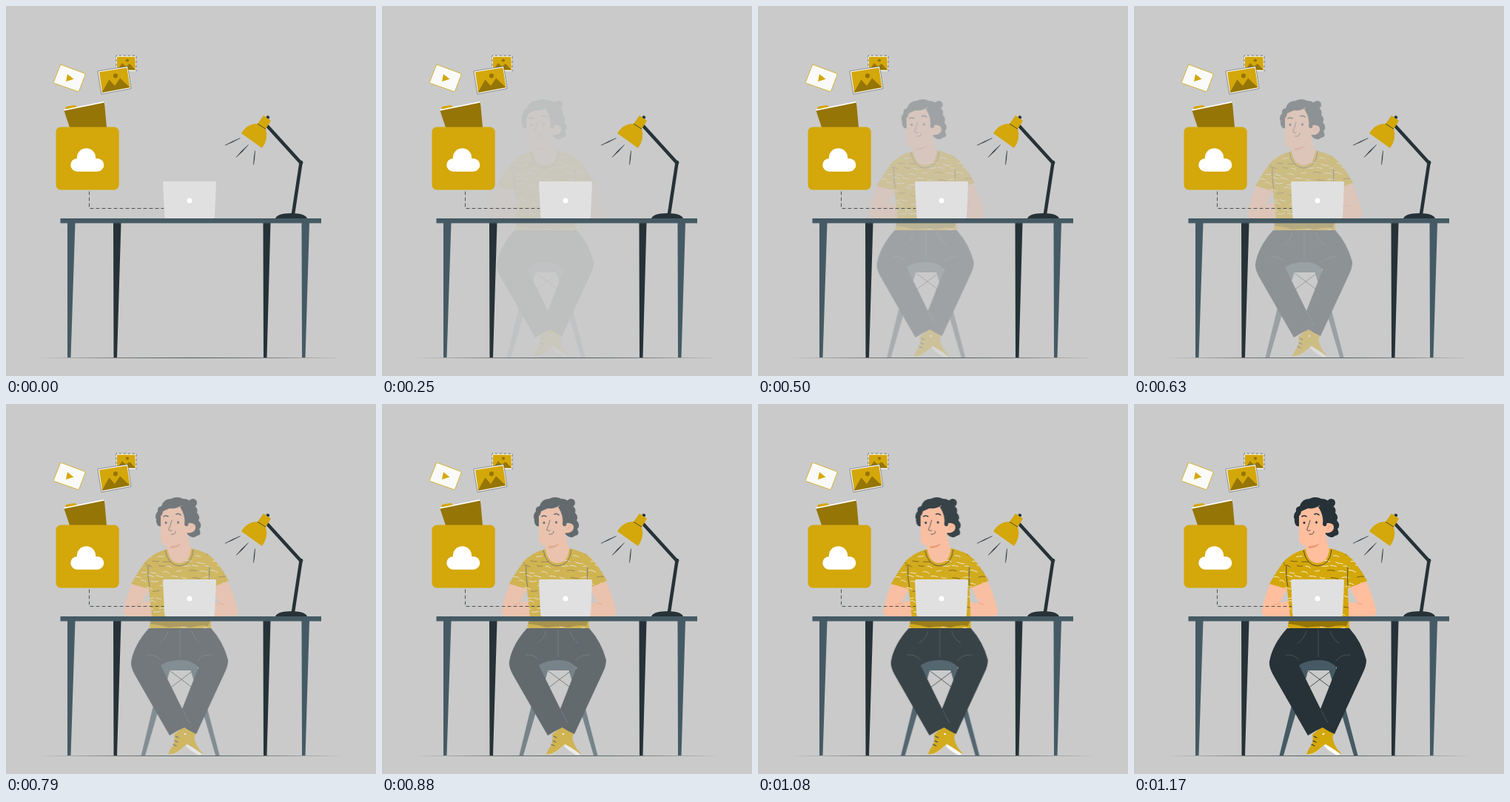
An HTML page that plays this animation: 500 px wide and 500 px high, repeating every 1.21 s.

```html
<!DOCTYPE html>
<html lang="en">
<head>
<meta charset="utf-8">
<title>Desk and cloud</title>
<style>
html, body { margin: 0; width: 100%; height: 100%; overflow: hidden; background: #cacaca; }
svg { display: block; width: 100vw; height: 100vh; }
#person { opacity: 0; }
.gold { fill: #d4a70a; }
.brown { fill: #957506; }
.dark { fill: #263238; }
.slate { fill: #455a64; }
.skin { fill: #ffbe9d; }
.white { fill: #fff; }
.line { fill: none; stroke: #263238; stroke-width: .8; stroke-linecap: round; stroke-linejoin: round; }
.fold { fill: none; stroke: #5b676d; stroke-width: .6; stroke-linecap: round; }
</style>
</head>
<body>
<svg viewBox="0 0 500 500">
  <defs>
    <clipPath id="shirtClip">
      <path id="shirt" d="M232 196Q214 201 204 211Q195 222 183 243L207 250L211 287L207 303H291L289 249L315 239Q305 221 295 210Q285 199 264 195Q263 214 248 215Q235 215 232 196Z"/>
    </clipPath>
  </defs>

  <path class="dark" d="M45 475.4Q250 474.6 455 475.4Q250 476.2 45 475.4Z"/>

  <g id="person">
    <!-- chair -->
    <path class="slate" d="M225 358H236L202 475H196.5ZM263 358H272L302.5 475H297Z"/>
    <path class="line" d="M236 361L268 385M266 361L234 385"/>
    <path class="slate" d="M223 350Q248 338 273 350V360H223Z"/>

    <!-- shoes -->
    <path class="gold" d="M257 457L268 450Q271 464 278 470Q281 473 277 474Q266 468 257 459Z"/>
    <path class="white" d="M257 459Q267 464 279 473Q277 475 273 474Q263 469 256 461Z"/>
    <path class="gold" d="M241 447L255 435L270 445L268 452Q258 460 247 469Q240 474 233 474Q235 467 239 462Q243 455 241 447Z"/>
    <path class="line" style="stroke:#e8dcb0" d="M234 474Q241 474 248 469L260 459"/>
    <path class="line" style="stroke-width:1.1" d="M243 449L247 451M242 455L246 457M240 460L244 462"/>
    <circle class="white" cx="256" cy="446" r="1.3"/>

    <!-- trousers -->
    <path class="dark" d="M314 346Q314 354 309 364L271 446Q262 442 253 436L246 430L252 412L274 356Q264 345 249 346H240V303H291Q308 322 314 346Z"/>
    <path class="dark" d="M207 303H255V346Q234 345 223 353L252 412L262 431L257 436Q246 441 235 448L188 366Q182 355 183 348Q187 325 207 303Z"/>
    <path class="fold" d="M249 305V342M205 339Q217 338 223 346M292 339Q279 338 273 347M221 323Q230 318 233 307M277 323Q268 318 265 307M253 414L262 431"/>

    <!-- arms -->
    <path class="skin" d="M184 242L208 248L197 269Q205 266 215 265V287H180Q172 287 173 279Q176 262 184 242Z"/>
    <path class="skin" d="M291 246L313 238Q322 258 327 278Q329 287 320 287H281V272Q285 265 290 268L302 269Z"/>
    <path class="fold" style="stroke:#d98f6d" d="M197 269Q192 271 189 272M302 269L308 271"/>

    <!-- hair, face and neck -->
    <circle class="dark" cx="266.5" cy="133.5" r="5.5"/>
    <path class="dark" d="M220 165Q216 161 217 156Q214 150 219 145Q218 139 224 138Q227 128 237 128Q245 124 253 128Q263 128 267 137Q274 140 272 147Q277 152 274 157Q280 164 275 169Q279 177 272 178Q266 183 260 177L250 168Z"/>
    <path class="skin" d="M232 192H237L255 176H259L262 192L265 196Q263 215 248 216Q235 215 231 197Z"/>
    <path class="skin" d="M223 150Q226 141 235 141Q245 142 251 137Q256 146 256 156L258 164Q259 160 264 161Q271 162 270 168Q268 175 259 174Q258 183 251 188Q243 193 233 192Q224 191 223 184Z"/>
    <path fill="#eb996e" d="M236 192Q245 192 251 188Q247 195 236 195Z"/>
    <path class="dark" d="M252 137Q263 143 262 154L260 164Q257 167 255 163Q257 151 249 139ZM221 152Q225 152 226 145L235 141L224 140Z"/>
    <path class="line" style="stroke-width:1.6" d="M227 152Q230 150 233 152M244 149Q247 147 250 150"/>
    <path class="line" d="M238 157Q236 165 233.5 170Q235 172 238 171M237 176Q243 177 243 172"/>
    <ellipse class="dark" cx="230" cy="160.500" rx="1.4" ry="1.8"/>
    <ellipse class="dark" cx="246.500" cy="160" rx="1.4" ry="1.8"/>
    <path class="fold" style="stroke:#d98f6d" d="M262 169Q263 164 267 165"/>

    <!-- shirt -->
    <use href="#shirt" class="gold"/>
    <g clip-path="url(#shirtClip)">
      <g id="marks"></g>
      <path class="brown" d="M207 293H290L287 300Q276 298 263 302Q249 299 234 302Q221 298 208 297Z"/>
    </g>
    <path class="line" d="M229 198Q233 218 248 219Q265 218 267 197M206 219Q205 234 208 247M289 220Q288 232 289 246"/>
  </g>

  <path class="line" stroke-dasharray="4 4" d="M112.500 251V273.500H213"/>

  <!-- desk -->
  <path class="dark" d="M145 293H155.500L150 475H145.500ZM347.500 293H357.500L352.500 475H348Z"/>
  <path class="slate" d="M83 293H93.500L87.500 475H83ZM399.500 293H410L404.500 475H400Z"/>
  <path class="dark" d="M364 287Q367 280 385.500 280T407 287Z"/>
  <path class="slate" d="M73.500 287H426V293.500H73.500Z"/>

  <!-- laptop -->
  <path fill="#e0e0e0" d="M214 237H282Q284 237 284 239L282 285Q282 287 280 287H216Q214.400 287 214.300 285L212 239Q212 237 214 237Z"/>
  <circle class="white" cx="248" cy="263" r="3.500"/>

  <!-- lamp -->
  <path class="line" style="stroke-width:4.600" d="M388 281L398.500 212L353 162"/>
  <circle class="dark" cx="398.500" cy="211.500" r="2.800"/>
  <circle class="dark" cx="353.800" cy="150.500" r="2.300"/>
  <path class="gold" d="M348 148L358 155L351 166Q355 180 346 192L318 172Q326 159 340 159Z"/>
  <path class="line" d="M340.500 159.500L350.500 166"/>
  <path class="dark" d="M296 188.300Q306 182.500 316.500 178.500Q307 184 296 188.300ZM311 204.500Q318 195.500 327.500 187.500Q320 197 311 204.500ZM334.500 214.500Q334.800 205 336.500 195.500Q336.400 206 334.500 214.500Z" stroke="#263238" stroke-width=".4"/>

  <!-- files -->
  <path class="white" d="M149 67L175.500 67.500L176 88L149 87.500Z"/>
  <path class="gold" d="M150 68.500L174.500 68.800L175 86.500L150 86Z"/>
  <path class="brown" d="M151 86L157 77L162 82L167 78L175 86.500Z"/>
  <circle class="brown" cx="164" cy="73.500" r="2.100"/>
  <path class="line" style="stroke-width:.6" stroke-dasharray="3 3" d="M149 87V66.800L176 67.200V88"/>

  <path class="white" stroke="#263238" stroke-width=".5" d="M124 88L164.500 81.500L169 111.500L129 119Z"/>
  <path class="gold" d="M126 89.300L163.500 83.300L167.500 110L130 117Z"/>
  <path class="brown" d="M129.800 116.500L139.500 99.500L147 108L154 97.500L167.500 110L130 117Z"/>
  <circle class="brown" cx="148" cy="94.300" r="3.100"/>

  <path fill="#fafafa" stroke="#d4a70a" stroke-width=".8" stroke-linejoin="round" d="M75 79.500L106 91Q107.500 92 107 93L99 114Q98 116 97 115.500L65.500 104.500Q64 104 64.500 102.500L73 81Q73.500 79 75 79.500Z"/>
  <path class="gold" d="M83 92L91.500 98.800L81 102Z"/>

  <path class="gold" d="M80 139Q80 136 83 135.500L93 134Q95 134 96.500 137L97 141Z"/>
  <path class="white" d="M78 140L132 129L134 133L80 144Z"/>
  <path class="brown" d="M78.500 141.500L133 130.500L136 164H86Z"/>
  <rect class="gold" x="67.500" y="163.500" width="85.200" height="85" rx="6.500"/>
  <rect class="white" x="87.300" y="206" width="45" height="17.700" rx="8.800"/>
  <circle class="white" cx="108.500" cy="205" r="12.700"/>
</svg>
<script>
const LOOP = 1210;
const FRAME = 1000 / 24;
const FIRST = 6;
const STEPS = 22;

// Short pale and dark flecks spread over the shirt cloth.
function drawMarks() {
  let seed = 11;
  const rnd = () => (seed = (seed * 16807) % 2147483647) / 2147483647;
  const paths = { "#fff": "", "#5f4b08": "" };
  for (let y = 203, row = 0; y < 303; y += 7, row++) {
    for (let x = 184 + (row % 2) * 8; x < 316; x += 16) {
      const color = rnd() < 0.82 ? "#fff" : "#5f4b08";
      const len = 6 + rnd() * 4;
      const px = x + rnd() * 6, py = y + rnd() * 4;
      paths[color] += `M${px} ${py}q${len / 2} ${rnd() * 4 - 2} ${len} ${rnd() * 4 - 1}`;
    }
  }
  document.getElementById("marks").innerHTML = Object.entries(paths).map(([color, d]) =>
    `<path d="${d}" fill="none" stroke="${color}" stroke-width=".8" stroke-linecap="round"/>`).join("");
}

// Slide in from the left while fading, slightly accelerating, at 24 steps a second.
function pose(k) {
  const p = Math.min(1, 0.07 + 0.0267 * k + 0.00071 * k * k);
  const at = Math.round((FIRST + k) * FRAME / 10) * 10;
  return {
    offset: (at - 0.5) / LOOP,
    opacity: p,
    transform: `translateX(${-30 * (1 - p)}px)`,
    easing: "steps(1, end)"
  };
}

drawMarks();
const poses = Array.from({ length: STEPS + 1 }, (_, k) => pose(k));
const hidden = { ...poses[0], offset: 0, opacity: 0 };
const last = { ...poses[STEPS], offset: 1 };
document.getElementById("person").animate([hidden, ...poses, last], { duration: LOOP, iterations: Infinity });
</script>
</body>
</html>
```
